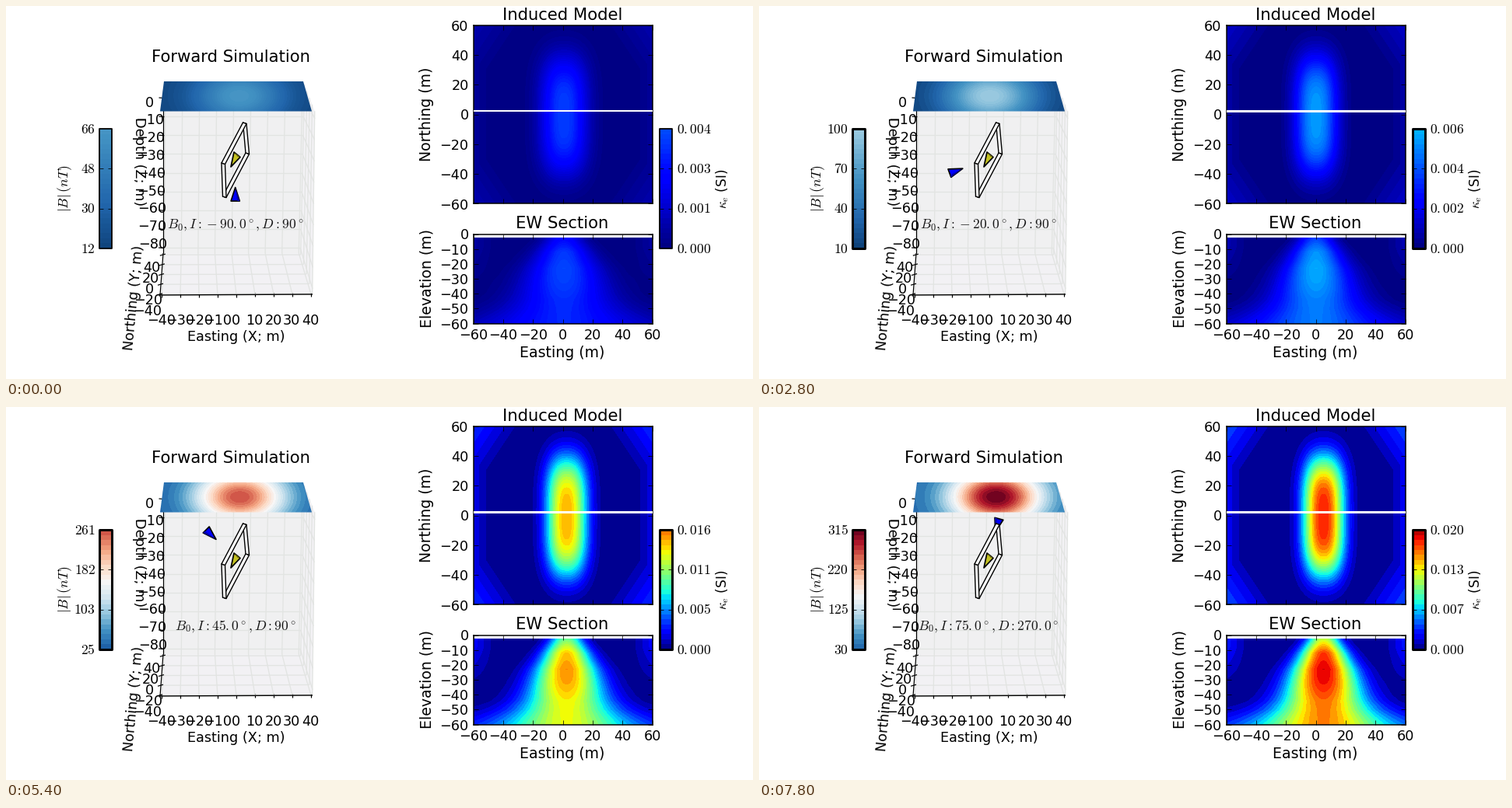
A matplotlib script that plays this animation: 960x480 px, repeating every 8000 ms.

```python
import numpy as np
import matplotlib.pyplot as plt
from matplotlib.animation import FuncAnimation
from matplotlib.colors import Normalize
from matplotlib.patches import Polygon, Rectangle

W, H, DPI = 960, 480, 100
FRAMES, INTERVAL = 40, 200
BANDS = 24
PT = 72 / DPI                       # points per pixel
TICK, LABEL, TITLE = 17.6 * PT, 18.9 * PT, 21.1 * PT

plt.rcParams.update({
    "font.family": "DejaVu Sans",
    "mathtext.fontset": "cm",
    "font.size": TICK,
})

# Ranges over the sweep of the inducing field
STEP = [0, 3, 5, 6, 9, 14, 19, 23, 28, 32, 36, 39]
B_MAX = [66, 34, 14, 14, 38, 100, 168, 220, 271, 300, 313, 315]
B_MIN = [12, 5, 2, 2, 4, 10, 16, 20, 26, 30, 30, 30]
K_MAX = [4.1, 2.1, 0.9, 0.9, 2.1, 6.2, 10.3, 13.7, 16.7, 18.4, 19.4, 19.6]
STOP = [0, 9, 14, 19, 23, 32, 39]
BODY_X = [0.5, -1, 0, 0.7, 1.7, 3.2, 5]
SHEET_X = [300, 300, 297, 298, 299, 303, 305]

B_NORM = Normalize(0, 315)
K_NORM = Normalize(0, 20.3)

fig = plt.figure(figsize=(W / DPI, H / DPI), dpi=DPI, facecolor="white")
stage = fig.add_axes([0, 0, 1, 1])
stage.axis("off")


def label(x, y, s, size=TICK, rot=0, ha="center", va="center", **kw):
    return stage.text(x, y, s, fontsize=size, rotation=rot, ha=ha, va=va, **kw)


def number(v):
    return f"{v}".replace("-", "\u2212")


def spaced(text):
    """Leave a small gap after each decimal point."""
    return text.replace(".", "{.}")


def line(p, q, color="k", lw=1.0, z=2):
    stage.plot(*zip(p, q), color=color, lw=lw * PT, zorder=z,
               solid_capstyle="butt")


def shape(pts, face, edge="none", lw=0.0, z=1):
    patch = Polygon(pts, closed=True, fc=face, ec=edge, lw=lw * PT, zorder=z,
                    joinstyle="round")
    return stage.add_patch(patch)


def picture(ax, extent, cmap, norm, z=1):
    return ax.imshow(np.zeros((2, 2)), extent=extent, cmap=cmap, norm=norm,
                     aspect="auto", interpolation="nearest", zorder=z)


def lerp(p, q, t):
    return tuple(np.array(p) + (np.array(q) - np.array(p)) * t)


# ---- 3D box -------------------------------------------------------------
TL, TR = (203, 100), (383, 100)
BL, BR = (202, 318), (378, 318)
FL, FR = (198, 372), (394, 371)
RT = (397, 136)
GRID = "#e2e4e2"

shape([TL, TR, BR, BL], "#f0f0f1")
shape([TR, RT, FR, BR], "#f3f2f5")
shape([BL, BR, FR, FL], "#f2f1f4")
for i in range(9):
    t = 0.01 + 0.98 * i / 8
    top, mid, low = lerp(TL, TR, t), lerp(BL, BR, t), lerp(FL, FR, t)
    line(top, mid, GRID, 1.3)
    line(mid, low, GRID, 1.3)
    zl = lerp((202.5, 118), (202, 311), i / 8)
    zr = lerp((382.5, 118), (378, 311), i / 8)
    zf = lerp((397, 145), (394, 364), i / 8)
    line(zl, zr, GRID, 1.3)
    line(zr, zf, GRID, 1.3)
    line((zl[0] - 6, zl[1]), (zl[0] + 1, zl[1] + 0.5), lw=1.2)
    line((low[0], low[1] - 2), (low[0], low[1] + 3), lw=1.2)
    label(200 + 23.9 * i, 405.5, number(10 * i - 40))
    label(184.5 + 0.5 * i, 124.5 + 22.8 * i, number(-10 * i))
for i in range(5):
    t = 0.04 + 0.235 * i
    l, r = lerp(BL, FL, t), lerp(BR, FR, t)
    line(l, r, GRID, 1.3)
    line(r, lerp(TR, RT, t), GRID, 1.3)
    line((l[0] - 4, l[1] + 1), (l[0] + 3, l[1] - 1), lw=1.2)
    label(187 - 1.3 * i, 337 + 14 * i, number(40 - 20 * i))
line((202, 108), BL, lw=1.2)
line(BL, FL, lw=1.2)
line(FL, FR, lw=1.4)

label(289, 66, "Forward Simulation", TITLE)
label(295.5, 426, "Easting (X; m)")
label(165, 376, "Northing (Y; m)", rot=84.5)
label(171, 200, "Depth (Z; m)", rot=-90)
field_text = label(294.5, 282, "", color="#161616", zorder=9)

# ---- field sheet on top of the box --------------------------------------
sheet = picture(stage, (197, 395, 136, 96), "RdBu_r", B_NORM, z=5)
sheet.set_clip_path(Polygon([(203, 97), (382, 97), (393, 135.5), (198, 135.5)],
                            transform=stage.transData))
sx, sy = np.meshgrid(np.arange(197.25, 395, 0.5), np.arange(96.25, 136, 0.5))

# ---- arrows and plate ---------------------------------------------------
cone = shape([(0, 0)] * 3, "#0000ff", "k", 1.7, z=6)
cone_side = shape([(0, 0)] * 3, "#0000a8", z=6.1)

plate = np.array([(277, 202), (304.5, 150), (308, 189), (278.5, 245)])
thick = np.array([4.5, 1.5])
for i in (2, 1, 3, 0):
    p, q = plate[i], plate[(i + 1) % 4]
    shape([p, q, q + thick, p + thick], "white", "k", 1.4, z=7)
shape([(289, 207), (293, 188), (301, 194.5)], "#c3c122", "k", 1.7, z=8)
shape([(293, 188), (301, 194.5), (297.5, 194)], "#6e6c10", z=8.1)

# ---- colour bars --------------------------------------------------------
BAR_TOP, BAR_LOW = 158, 312


def colour_bar(x, cmap, norm, text_x, ha):
    im = picture(stage, (x, x + 16, BAR_LOW, BAR_TOP), cmap, norm, z=3)
    frame = stage.add_patch(Rectangle((x, BAR_TOP), 16, BAR_LOW - BAR_TOP,
                                      fc="none", ec="k", zorder=4,
                                      joinstyle="round"))
    ys = np.linspace(BAR_LOW, BAR_TOP, 4)
    for y in ys[1:3]:
        line((x, y), (x + 5, y), lw=0.8, z=4)
        line((x + 11, y), (x + 16, y), lw=0.8, z=4)
    return im, frame, [label(text_x, y + 0.5, "", ha=ha) for y in ys]


b_bar, b_frame, b_ticks = colour_bar(120, "RdBu_r", B_NORM, 115, "right")
k_bar, k_frame, k_ticks = colour_bar(840, "jet", K_NORM, 861.5, "left")
label(76, 235, r"$|B|\,(nT)$", rot=90)
label(921, 235, r"$\kappa_e$ (SI)", 17 * PT, rot=90)

# ---- model slices -------------------------------------------------------


def slice_axes(x, y, w, h, low):
    ax = fig.add_axes([x / W, 1 - (y + h) / H, w / W, h / H])
    im = picture(ax, (-60, 60, -60, -2.6 if low == 0 else 60), "jet", K_NORM)
    ax.set(xlim=(-60, 60), ylim=(-60, low), xticks=range(-60, 61, 20))
    ax.tick_params(direction="in", top=True, right=True, labelsize=TICK,
                   length=5.9 * PT, width=0.75 * PT, pad=5.9 * PT)
    for s in ax.spines.values():
        s.set_linewidth(1.5 * PT)
    return ax, im


plan_ax, plan = slice_axes(600.5, 24.5, 230, 230, 60)
plan_ax.set_yticks(range(-60, 61, 20))
plan_ax.tick_params(labelbottom=False)
cut = plan_ax.axhline(2.6, color="white", zorder=3)
sec_ax, section = slice_axes(600.5, 293.5, 230, 115, 0)
sec_ax.set_yticks(range(-60, 1, 10))
sec_ax.tick_params(axis="x", pad=6.9 * PT)

label(715, 11.5, "Induced Model", TITLE)
label(715, 280, "EW Section", TITLE)
label(715, 447, "Easting (m)", LABEL)
label(541, 139, "Northing (m)", LABEL, rot=90)
label(541, 351, "Elevation (m)", LABEL, rot=90)

px, py = np.meshgrid(np.linspace(-60, 60, 230), np.linspace(60, -60, 230))
qx, qz = np.meshgrid(np.linspace(-60, 60, 230), np.linspace(-2.6, -60, 110))
DEPTH = [-60, -50, -40, -30, -23, -12, -3]
sec_amp = np.interp(qz, DEPTH, [.70, .77, .86, .94, .96, .88, .62])
sec_wide = np.interp(qz, DEPTH, [43, 33, 27, 23, 20.5, 15.5, 11.5])
sec_pow = np.interp(qz, [-60, -35], [1.8, 2.1])

stage.set(xlim=(0, W), ylim=(H, 0))


def bands(rel):
    return (np.floor(np.clip(rel, 0, 0.999) * BANDS) + 0.5) / BANDS


def plan_field(xc, spread):
    core = 0.91 * np.exp(-np.abs((px - xc) / (14 * spread)) ** 2.3
                         - np.abs((py + 1) / 41) ** 3.3)
    r = np.maximum(np.abs(px), 0.72 * np.abs(px) + 0.48 * np.abs(py))
    return core + 0.17 * np.clip((r - 47) / 20, 0, 1)


def section_field(xc, spread):
    d = np.abs(qx - xc) / (sec_wide * spread)
    core = sec_amp * np.exp(-d ** sec_pow)
    top = 0.18 * np.clip((np.abs(qx) - 44) / 20, 0, 1) * np.clip((38 + qz) / 30, 0, 1)
    low = 0.1 * np.clip((-qz - 44) / 16, 0, 1)
    return core + top + low


def sheet_field(xc):
    r2 = ((sx - xc) / 59) ** 2 + ((sy - 116) / 35) ** 2
    return np.exp(-r2 ** 1.02)


def draw(n):
    angle = 5 * n - 90
    b_hi, b_lo = np.interp(n, STEP, B_MAX), np.interp(n, STEP, B_MIN)
    k_hi = np.interp(n, STEP, K_MAX)
    xc = np.interp(n, STOP, BODY_X)
    spread = np.interp(n, [0, 19], [1.15, 1])

    sheet.set_data(b_lo + (b_hi - b_lo) * bands(sheet_field(np.interp(n, STOP, SHEET_X))))
    plan.set_data(k_hi * bands(plan_field(xc, spread)))
    section.set_data(k_hi * bands(section_field(xc, spread)))

    column = bands(np.linspace(1, 0, 154))[:, None]
    b_bar.set_data(b_lo + (b_hi - b_lo) * column)
    k_bar.set_data(k_hi * column)
    for i in range(4):
        b_ticks[i].set_text(f"${b_lo + (b_hi - b_lo) * i / 3:.0f}$")
        k_ticks[i].set_text(spaced(f"${k_hi * i / 3000:.3f}$"))

    heavy = n > 0
    cut.set_linewidth((3 if heavy else 2) * PT)
    for f in (b_frame, k_frame):
        f.set_linewidth((3 if heavy else 1.8) * PT)

    a = np.radians(angle)
    c, s = np.cos(a), np.sin(a)
    mid = np.array([294.7, 196.5])
    tip = mid - (35 * c, 37 * s)
    base = mid - (53 * c, 54.5 * s)
    side = 5.6 * np.array([-s, c])
    cone.set_xy([tip, base + side, base - side])
    cone_side.set_xy([tip, base + side, base + 0.45 * side])

    inc, dec = (angle, "90") if angle <= 90 else (180 - angle, "270.0")
    field_text.set_text(spaced(rf"$B_0, I: {inc:.1f}^\circ, D: {dec}^\circ$"))
    return []


anim = FuncAnimation(fig, draw, frames=FRAMES, interval=INTERVAL,
                     repeat=True, repeat_delay=0, blit=False)
plt.show()
```
